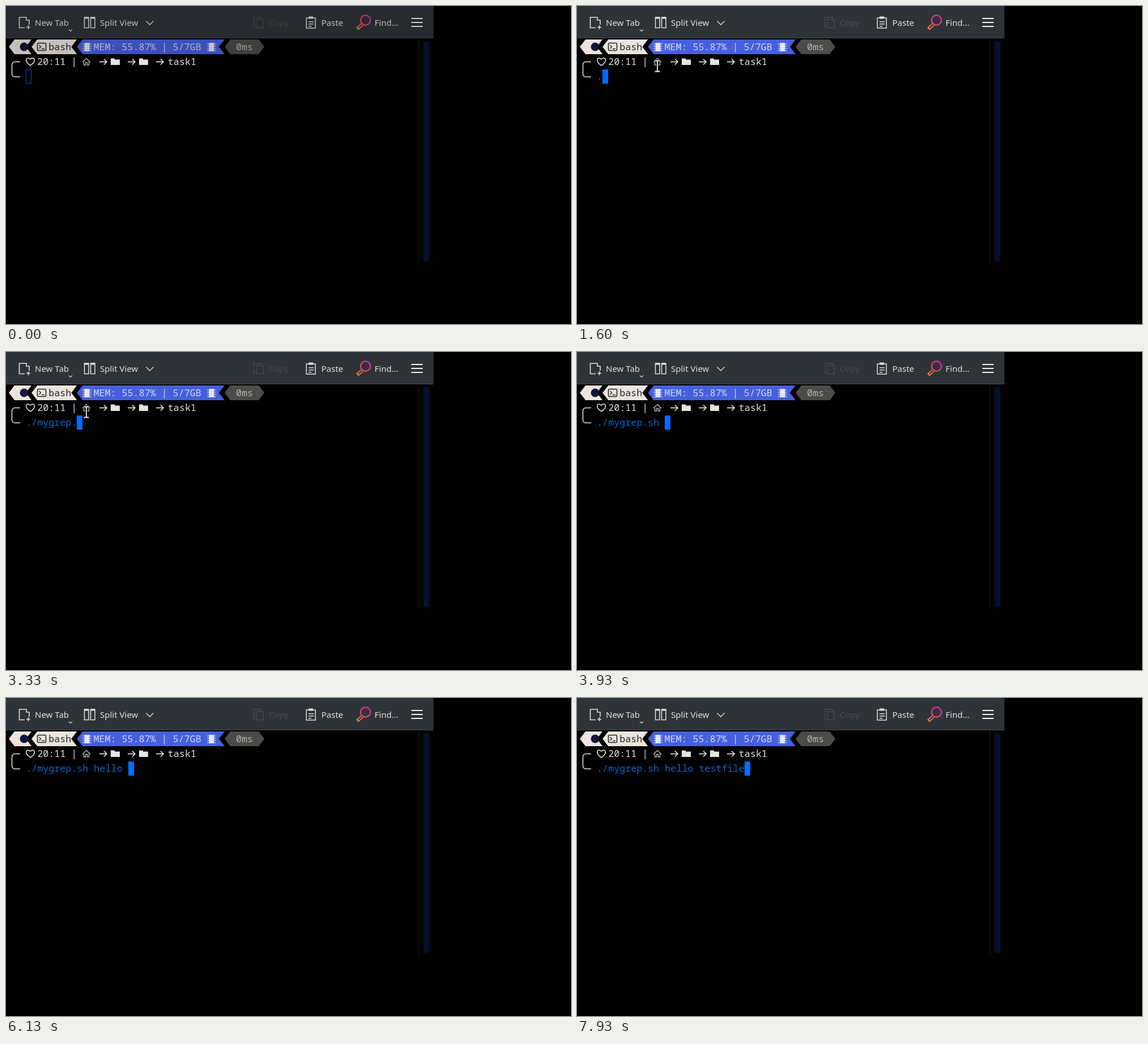
Animation of 998x561 px, one loop 8 s. Source, as an HTML page with a canvas:

```html
<!DOCTYPE html>
<html lang="en">
<head>
<meta charset="utf-8">
<title>Terminal typing</title>
<style>
html, body { margin: 0; width: 100%; height: 100%; overflow: hidden; background: #000; }
canvas { display: block; width: 998px; height: 561px; }
</style>
</head>
<body>
<canvas id="stage" width="998" height="561"></canvas>
<script>
const ctx = document.getElementById('stage').getContext('2d');
const LOOP = 8000;
const CELL = 10.03;
const MONO = '16.72px "Noto Sans Mono", monospace';
const SANS = '15px "Noto Sans", "Open Sans", sans-serif';
const LABEL = '#e0e0de';
const TEXT = '#e6e4de';
const LIGHT = '#ebe5de';

// Bursts of evenly spaced keys: first key, last key, keys ('<' is a backspace)
const bursts = [
  [1600, 2130, './my'], [2600, 2930, 'grep'], [3330, 3600, '.sh'],
  [3930, 4330, ' he'], [4530, 5130, 'llp '], [5400, 5530, '<<'],
  [6070, 6130, 'o '], [6930, 7330, 'test'], [7600, 7930, 'file']
];

// Pointer rests: from, to, x, y
const rests = [[930, 1400, 142, 92], [1400, 3930, 142, 106], [4200, 5400, 93, 128]];

const col = n => 5 + n * CELL;

function command(t) {
  let s = '';
  for (const [first, last, keys] of bursts) {
    const gap = (last - first) / (keys.length - 1);
    const count = Math.max(0, Math.floor((t - first) / gap + 1.001));
    for (const key of keys.slice(0, count)) s = key === '<' ? s.slice(0, -1) : s + key;
  }
  return s;
}

function text(s, x, y, color, font = MONO) {
  ctx.font = font;
  ctx.fillStyle = color;
  ctx.fillText(s, x, y);
}

function trace(points, close) {
  ctx.beginPath();
  points.forEach(([x, y]) => ctx.lineTo(x, y));
  if (close) ctx.closePath();
}

function stroke(color, width) {
  ctx.strokeStyle = color;
  ctx.lineWidth = width;
  ctx.stroke();
}

function line(color, width, ...points) {
  trace(points);
  stroke(color, width);
}

function poly(color, ...points) {
  trace(points, true);
  ctx.fillStyle = color;
  ctx.fill();
}

function rect(color, x, y, w, h) {
  ctx.fillStyle = color;
  ctx.fillRect(x, y, w, h);
}

function frame(color, x, y, w, h, width = 1.5, radius = 0) {
  ctx.beginPath();
  ctx.roundRect(x, y, w, h, radius);
  stroke(color, width);
}

function disc(color, x, y, r) {
  ctx.beginPath();
  ctx.arc(x, y, r, 0, Math.PI * 2);
  ctx.fillStyle = color;
  ctx.fill();
}

// Prompt segment between two columns; the right end is notched or pointed.
function chip(color, from, to, notch = true) {
  const x = col(from), end = col(to), inner = end - CELL;
  const tail = notch
    ? [[end, 59], [inner, 72], [end, 85]]
    : [[inner, 59], [end, 72], [inner, 85]];
  poly(color, [x, 72], [x + CELL, 59], ...tail, [x + CELL, 85]);
}

function memoryIcon(x) {
  for (let y = 66; y < 80; y += 4) rect('#8f9cea', x - 8, y, 16, 2);
  rect('#e4e6ff', x - 4.5, 65, 9, 15);
}

function arrow(x) {
  line(TEXT, 1.7, [x - 7, 98.5], [x + 6, 98.5]);
  line(TEXT, 1.7, [x + 1, 93.5], [x + 6, 98.5], [x + 1, 103.5]);
}

function folder(x) {
  rect(TEXT, x - 8, 92.5, 7, 4);
  rect(TEXT, x - 8, 94.5, 16, 9.5);
}

function heart(x, y) {
  ctx.beginPath();
  ctx.moveTo(x, y + 7);
  ctx.bezierCurveTo(x - 12, y - 1, x - 7, y - 10, x, y - 4);
  ctx.bezierCurveTo(x + 7, y - 10, x + 12, y - 1, x, y + 7);
  stroke(TEXT, 1.6);
}

function house(x, y) {
  const wall = '#b4b4b0';
  line(wall, 1.4, [x - 7, y + 1], [x, y - 5.5], [x + 7, y + 1]);
  for (const s of [-1, 1]) {
    line(wall, 1.4, [x + s * 4.5, y], [x + s * 4.5, y + 6], [x + s * 1.5, y + 6], [x + s * 1.5, y + 1.5], [x, y + 1.5]);
  }
}

function clipboard(x) {
  frame(LABEL, x, 21, 16, 18);
  rect(LABEL, x + 4, 18.5, 8, 4);
  for (let y = 27; y < 36; y += 4) rect(LABEL, x + 4, y, y > 33 ? 5 : 9, 1.5);
}

function magnifier(x, y) {
  const glow = ctx.createLinearGradient(x + 5, y - 10, x - 13, y + 17);
  glow.addColorStop(0, '#b83a9c');
  glow.addColorStop(0.55, '#d0485c');
  glow.addColorStop(1, '#ee8a3c');
  disc('#3f2b42', x, y, 8.7);
  ctx.beginPath();
  ctx.arc(x, y, 8.7, 0, Math.PI * 2);
  stroke(glow, 2.5);
  line(glow, 2, [x - 7, y + 6], [x - 15, y + 13], [x - 12.5, y + 16], [x - 4, y + 9]);
}

function toolbar() {
  rect('#2e3338', 0, 0, 755, 57);
  rect('#484a4a', 0, 56, 755, 1);

  line(LABEL, 1.6, [33, 38.5], [23.5, 38.5], [23.5, 20], [36, 20], [36, 25], [41, 25], [41, 33]);
  line(LABEL, 1.5, [36, 37.5], [43, 37.5]);
  line(LABEL, 1.5, [39.5, 34], [39.5, 41]);
  text('New Tab', 51, 35, LABEL, SANS);
  line(LABEL, 1.1, [111, 41.5], [114, 44.5], [117, 41.5]);

  for (const x of [138.5, 149.5]) {
    frame(LABEL, x, 20, 7.5, 18.5);
    rect(LABEL, x, 19.5, 7.5, 3);
  }
  text('Split View', 166, 35, LABEL, SANS);
  line(LABEL, 1.4, [247.5, 26.5], [254, 33], [260.5, 26.5]);

  const dim = '#484b4f';
  line(dim, 1.3, [441, 37], [438, 37], [438, 20], [451, 20], [451, 23]);
  frame(dim, 442.5, 24, 12, 14.5, 1.3);
  text('Copy', 464, 35, dim, SANS);

  clipboard(530.5);
  text('Paste', 557, 35, LABEL, SANS);
  magnifier(635, 25);
  text('Find...', 651, 35, LABEL, SANS);
  for (let y = 21; y < 36; y += 7) rect('#f0f0ee', 716, y, 20, 2);
}

function segments() {
  chip(LIGHT, 0, 4);
  disc('#12143c', 32, 72, 7.5);

  const ink = '#242428';
  chip(LIGHT, 4, 12);
  frame(ink, 55.5, 65.5, 15, 13, 1.6, 2);
  line(ink, 1.4, [58.5, 69], [61.5, 72], [58.5, 75]);
  line(ink, 1.4, [63, 75.5], [68, 75.5]);
  text('bash', col(7), 78, ink);

  chip('#4660dc', 12, 38);
  memoryIcon(143);
  memoryIcon(363);
  text('MEM: 55.87% | 5/7GB', col(15) - 1, 78, '#d0d6f6');

  chip('#4b4b4a', 38, 45, false);
  text('0ms', col(40), 78, '#b4b4b0');
}

function pathLine() {
  ctx.beginPath();
  ctx.moveTo(25, 98.5);
  ctx.arcTo(10.5, 98.5, 10.5, 112, 5);
  ctx.arcTo(10.5, 125, 25, 125, 5);
  ctx.lineTo(25, 125);
  stroke(TEXT, 1.5);

  heart(43, 98);
  text('20:11 |', col(5), 104, TEXT);
  house(142, 98);
  for (let x = 172; x < 280; x += 50) arrow(x);
  folder(193);
  folder(243);
  text('task1', col(28), 104, TEXT);
}

function beam(x, y) {
  for (const [color, width] of [['#111', 4.5], ['#e8e8e8', 1.8]]) {
    for (const s of [-1, 1]) {
      line(color, width, [x - 4.5, y + s * 9.5], [x - 1, y + s * 9.5], [x, y + s * 8],
        [x + 1, y + s * 9.5], [x + 4.5, y + s * 9.5]);
    }
    line(color, width, [x, y - 8.5], [x, y + 8.5]);
  }
}

function draw(t) {
  rect('#000', 0, 0, 998, 561);
  toolbar();
  segments();

  // The unfocused window is dimmed and brightens in two steps.
  const veil = t < 70 ? 0.16 : t < 130 ? 0.08 : 0;
  rect(`rgba(0, 0, 0, ${veil})`, 0, 0, 755, 86);

  pathLine();
  rect('#1f2012', 729, 58, 1, 396);
  ctx.beginPath();
  ctx.roundRect(737, 62, 11, 388, 4);
  ctx.fillStyle = '#00112a';
  ctx.fill();

  const typed = command(t);
  const x = Math.round(col(3 + typed.length));
  text(typed, col(3), 130, '#0a66c8');
  if (t >= 600) rect('#006cff', x, 112, 10, 25);
  else frame('#0a50c4', x + 0.5, 112.5, 9, 24, 1);

  const rest = rests.find(([from, to]) => t >= from && t < to);
  if (rest) beam(rest[2], rest[3]);
}

function tick(now) {
  draw(now % LOOP);
  requestAnimationFrame(tick);
}
draw(0);
requestAnimationFrame(tick);
</script>
</body>
</html>
```
